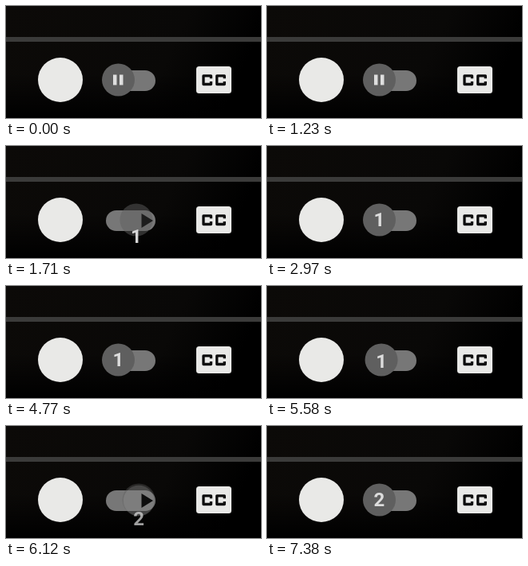
These frames come from a looping animation (319 by 141 pixels, 8 s). An HTML page:

```html
<!DOCTYPE html>
<html lang="en">
<meta charset="utf-8">
<title>Player toggle</title>
<style>
html, body { margin: 0; width: 100%; height: 100%; overflow: hidden; background: #000; }
svg { display: block; width: 100vw; height: 100vh; }
text { font: 700 24px Roboto, sans-serif; text-anchor: middle; fill: #dcdcdc; }
</style>
<svg viewBox="0 0 319 141">
  <defs>
    <linearGradient id="bg" x2="1" y2=".2">
      <stop stop-color="#0c0a08"/><stop offset=".7" stop-color="#090807"/><stop offset="1" stop-color="#000"/>
    </linearGradient>
    <linearGradient id="shade" x2="0" y2="1">
      <stop offset=".6" stop-color="#000" stop-opacity="0"/><stop offset="1" stop-color="#000"/>
    </linearGradient>
  </defs>
  <path fill="url(#bg)" d="M0 0h319v141H0z"/>
  <path fill="url(#shade)" d="M0 0h319v141H0z"/>
  <path fill="#3b3b3a" d="M0 39h319v6H0z"/>
  <circle cx="68" cy="93" r="28" fill="#e9e9e7"/>

  <rect id="track" x="125" y="81" width="62" height="26" rx="13" fill="#777"/>
  <circle id="light" cy="94" r="19.2" fill="#e9e9e9"/>
  <circle id="dark" cy="93" r="20.5" fill="#5f5f5f"/>
  <path id="play" fill="#0c0c0c" d="M169.500 85v18l14.500-9z"/>
  <path id="pause" fill="#dedede" d="M134 86.500h4.500v13H134zM142 86.500h4.500v13H142z"/>
  <text id="count"></text>

  <rect x="238" y="76" width="44" height="34" rx="3.500" fill="#e9e9e7"/>
  <g fill="none" stroke="#0c0c0c" stroke-width="3.300" stroke-linejoin="round">
    <path id="c" d="M256.500 91.200V87.800h-9.500v10.700h9.500V95"/>
    <use href="#c" x="16.800"/>
  </g>
</svg>
<script>
const $ = id => document.getElementById(id);
const clamp = x => Math.max(0, Math.min(1, x));
const ease = x => x * x * (3 - 2 * x);
const set = (id, attrs) => { for (const k in attrs) $(id).setAttribute(k, attrs[k]); };

// 0: switched on, light knob at the right; 1: switched off, dark knob at the left
function offAmount(t) {
  if (t < 1620) return 1;
  if (t < 1740) return .35 * (t - 1620) / 90;
  if (t < 5580) return 1;
  if (t < 6030) return 1 - ease(clamp((t - 5550) / 180));
  return ease(clamp((t - 6030) / 270));
}

function draw(now) {
  const t = Math.floor(now % 8000 / 30) * 30;
  const p = offAmount(t), x = 175 - 34.500 * p;
  const paused = t < 1620;
  set('light', { cx: x, opacity: clamp(1 - p / .33) });
  set('dark', { cx: x, opacity: clamp(p * 1.4) });
  set('play', { opacity: clamp((.8 - p) / .55) });
  set('pause', { opacity: paused ? 1 : 0 });
  set('count', { x, y: 101 + 32 * (1 - p), opacity: paused ? 0 : clamp(p / .36) });
  $('count').textContent = t < 5880 ? '1' : '2';
  requestAnimationFrame(n => draw(n - start));
}
const start = performance.now();
draw(0);
</script>
</html>
```
